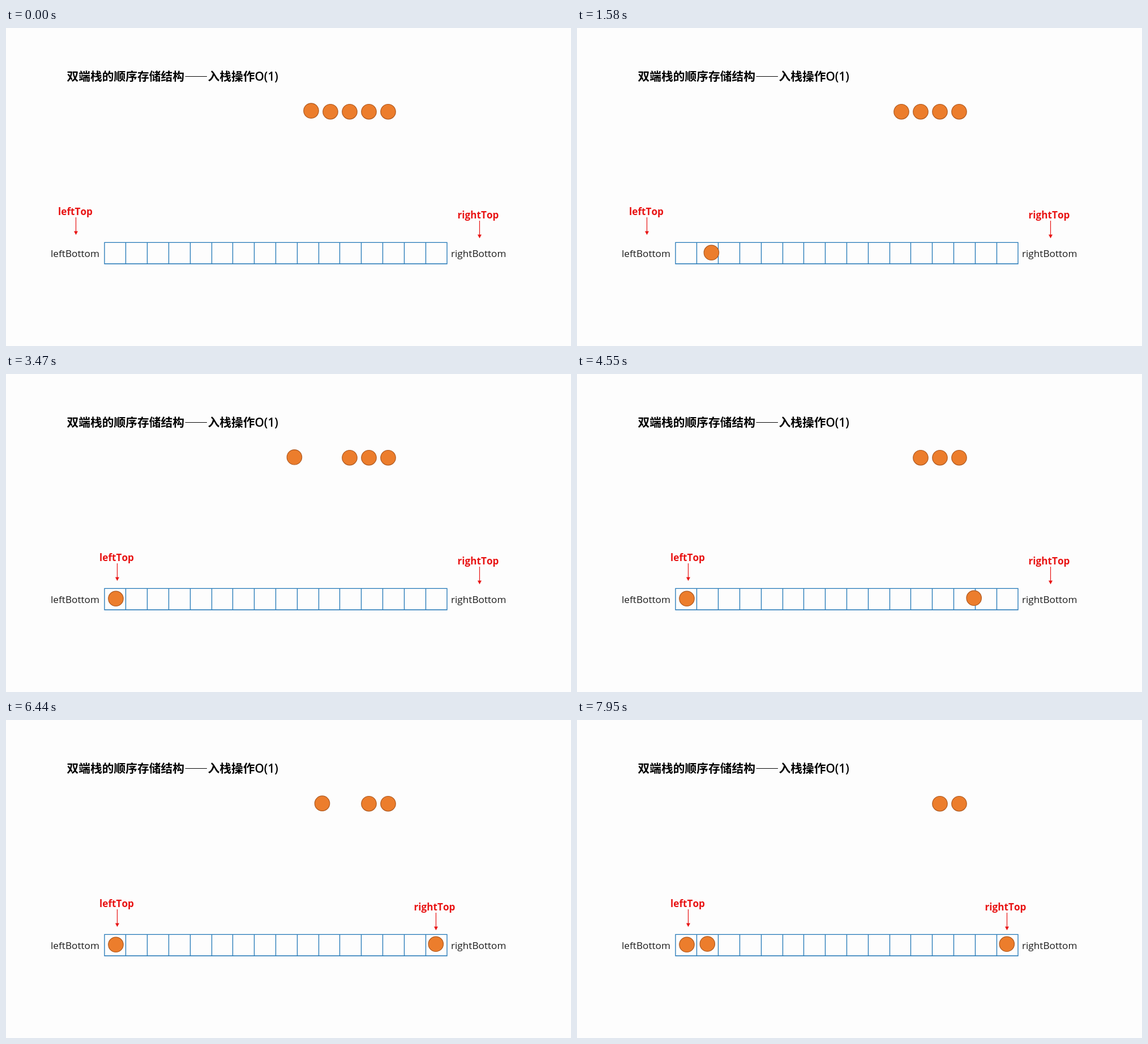
An HTML page that plays this animation: 998 by 561 pixels, repeating every 7.99 s.

```html
<!DOCTYPE html>
<html lang="zh-CN">
<head>
<meta charset="utf-8">
<title>双端栈</title>
<style>
  html, body { margin: 0; width: 100%; height: 100%; overflow: hidden; background: #fdfdfd; }
  svg { display: block; width: 998px; height: 561px; }
  text { font: 17.2px "Open Sans", "Noto Sans", sans-serif; font-kerning: none; fill: #1c1c1c; }
  .title { font: 700 20.75px "Noto Sans CJK SC", "Noto Sans CJK", sans-serif; fill: #000; }
  .order { font-size: 20.75px; font-weight: 600; fill: #000; }
  .pointer text { font-weight: 700; fill: #e81313; }
  .pointer line { stroke: #e81313; stroke-width: 1.2; }
  .pointer path { fill: #e81313; }
  .cells { fill: none; stroke: #1f76b6; stroke-width: 1.3; }
  circle { fill: #ec7d2c; stroke: #b05a20; stroke-width: 1.2; }
</style>
</head>
<body>
<svg viewBox="0 0 998 561">
  <text class="title" x="107.5" y="93">双端栈的顺序存储结构——入栈操作</text>
  <text class="order" x="439.5" y="93">O(1)</text>
  <text x="79" y="403.5">leftBottom</text>
  <text x="786" y="403.5">rightBottom</text>
  <path class="cells" id="cells"/>
  <g class="pointer" id="left">
    <text x="92" y="330">leftTop</text>
    <line x1="123.5" y1="334" x2="123.5" y2="360"/>
    <path d="M120 358.5h7l-3.5 6.5z"/>
  </g>
  <g class="pointer" id="right">
    <text x="797.5" y="336">rightTop</text>
    <line x1="836.5" y1="340" x2="836.5" y2="366"/>
    <path d="M833 364.5h7l-3.5 6.5z"/>
  </g>
  <g id="balls"></g>
</svg>
<script>
const LOOP = 7990, BALL_TIME = 1880, COLUMN = 455;
const byId = id => document.getElementById(id);

// Array of 16 cells
const cellCount = 16, x0 = 174, x1 = 779;
let outline = `M${x0} 378.3H${x1}V416H${x0}Z`;
for (let i = 1; i < cellCount; i++) {
  outline += `M${Math.floor(x0 + (x1 - x0) * i / cellCount) + 0.5} 378V416`;
}
byId("cells").setAttribute("d", outline);

// Each moving ball slides to the column, drops, then slides to its cell
const balls = [
  { from: [539, 146], to: [194, 396.3], start: 60 },
  { from: [573, 147.7], to: [759.3, 395.3], start: 3062 },
  { from: [607, 147.7], to: [230.3, 395], start: 6071 },
  { from: [641, 147.7] },
  { from: [675, 147.7] }
];
for (const ball of balls) {
  ball.node = document.createElementNS("http://www.w3.org/2000/svg", "circle");
  ball.node.setAttribute("r", 13.2);
  byId("balls").append(ball.node);
  if (ball.to) ball.path = [ball.from, [COLUMN, 146], [COLUMN, ball.to[1]], ball.to];
}

const pointers = [
  { node: byId("left"), shift: 73, start: 2020, duration: 1070 },
  { node: byId("right"), shift: -77, start: 4975, duration: 1110 }
];

// Constant acceleration, then constant deceleration
function progress(t, start, duration) {
  const u = Math.min(1, Math.max(0, (t - start) / duration));
  return u < 0.5 ? 2 * u * u : 1 - 2 * (1 - u) ** 2;
}

function pointAlong(path, fraction) {
  const lengths = path.slice(1).map((p, i) => Math.hypot(p[0] - path[i][0], p[1] - path[i][1]));
  let rest = fraction * lengths.reduce((a, b) => a + b);
  for (let i = 0; i < lengths.length; i++) {
    if (rest <= lengths[i]) {
      const k = rest / lengths[i];
      return path[i].map((v, axis) => v + (path[i + 1][axis] - v) * k);
    }
    rest -= lengths[i];
  }
  return path[path.length - 1];
}

function draw(t) {
  for (const { node, from, path, start } of balls) {
    const [x, y] = path ? pointAlong(path, progress(t, start, BALL_TIME)) : from;
    node.setAttribute("cx", x);
    node.setAttribute("cy", y);
  }
  for (const { node, shift, start, duration } of pointers) {
    node.setAttribute("transform", `translate(${shift * progress(t, start, duration)} 0)`);
  }
}

const began = performance.now();
function tick() {
  draw((performance.now() - began) % LOOP);
  requestAnimationFrame(tick);
}
tick();
</script>
</body>
</html>
```
